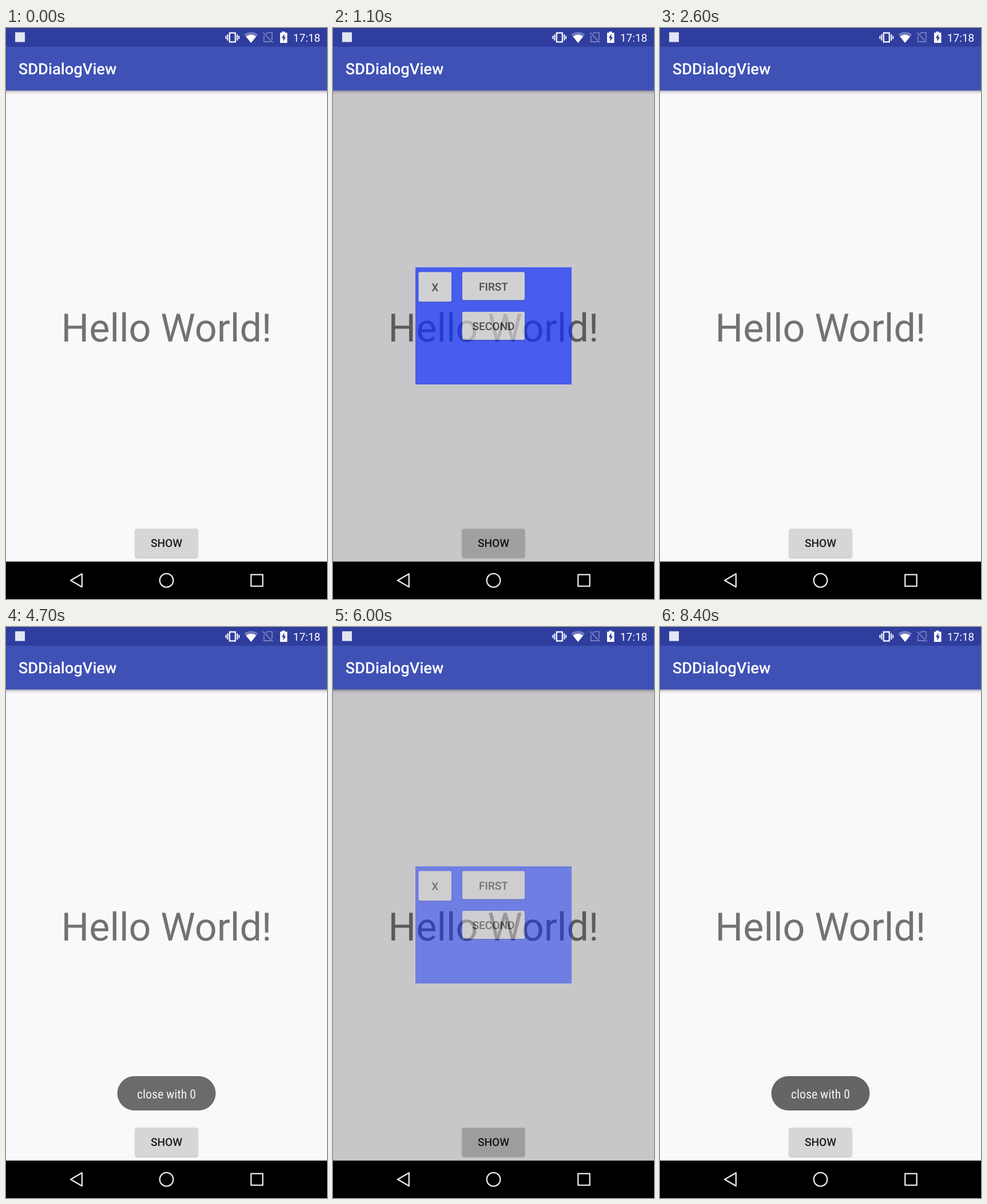
An HTML page for the animation above (8500 ms loop, 561 by 998 pixels).

```html
<!DOCTYPE html>
<html lang="en">
<head>
<meta charset="utf-8">
<title>SDDialogView</title>
<style>
  html, body { margin: 0; width: 100%; height: 100%; overflow: hidden; background: #000; }
  svg { display: block; width: 100vw; height: 100vh; }
  text { font-family: Roboto, sans-serif; text-rendering: geometricPrecision; }
  .mid { text-anchor: middle; }
  .label { font-size: 19.1px; font-weight: 500; fill: #000; fill-opacity: .87; }
  .face { fill: #d6d5d8; }
  .raised { filter: drop-shadow(0 1.6px 1.4px rgba(0, 0, 0, .34)); }
  .toast { font-family: "Roboto Condensed", Roboto, sans-serif; font-stretch: 75%; font-size: 21.8px; fill: #f4f4f4; }
  .nav { fill: none; stroke: #ececec; stroke-width: 2.3; stroke-linejoin: round; }
</style>
</head>
<body>
<svg viewBox="0 0 561 998" preserveAspectRatio="none">
  <defs>
    <linearGradient id="shade" x2="0" y2="1">
      <stop stop-color="#000" stop-opacity=".34"/>
      <stop offset=".4" stop-color="#000" stop-opacity=".12"/>
      <stop offset="1" stop-color="#000" stop-opacity="0"/>
    </linearGradient>
  </defs>

  <!-- page -->
  <rect width="561" height="998" fill="#f9f8fb"/>
  <text class="mid" x="280.5" y="547.5" font-size="68.2" fill-opacity=".54">Hello World!</text>
  <g class="raised"><rect class="face" x="226" y="875.5" width="109" height="49.5" rx="2.7"/></g>
  <rect id="ripple" x="226" y="875.5" width="109" height="49.5" rx="2.7" opacity="0"/>
  <text class="label mid" x="280.5" y="907.3">SHOW</text>
  <rect id="scrim" y="109" width="561" height="824" opacity="0"/>

  <!-- dialog -->
  <g id="dialog" opacity="0">
    <rect x="144" y="418.3" width="273" height="204.7" fill="#1030ff"/>
    <g class="raised">
      <rect class="face" x="149.5" y="426.5" width="57.5" height="51.8" rx="2.7"/>
      <rect class="face" x="226" y="426.5" width="109" height="49" rx="2.7"/>
      <rect class="face" x="226" y="496" width="109" height="49" rx="2.7"/>
    </g>
    <g class="label mid">
      <text x="178.2" y="459.8">X</text>
      <text x="280.5" y="458.5">FIRST</text>
      <text x="280.5" y="528">SECOND</text>
    </g>
  </g>

  <!-- toast -->
  <g id="toast" opacity="0">
    <rect x="194.5" y="785" width="172" height="60" rx="30" fill="#616062"/>
    <text class="toast mid" x="280.5" y="823.8">close with 0</text>
  </g>

  <!-- app bar -->
  <rect y="109" width="561" height="7" fill="url(#shade)"/>
  <rect width="561" height="109.2" fill="#3f51b5"/>
  <rect width="561" height="32.7" fill="#2f3e9e"/>
  <text x="21.8" y="81.4" font-size="27.3" font-weight="500" fill="#fff">SDDialogView</text>

  <!-- status icons -->
  <rect x="16" y="7.5" width="17" height="17" fill="#e2e5f2"/>
  <g fill="#fff">
    <path d="M390.8 8.6h10v15.8h-10z" fill="none" stroke="#fff" stroke-width="2.2"/>
    <path d="M386.4 11h2v11h-2zM383.4 13.7h2v5.6h-2zM403.2 11h2v11h-2zM406.2 13.7h2v5.6h-2z"/>
    <path d="M416.4 11.2Q428.3 2.8 440.2 11.2L428.3 26z" opacity=".32"/>
    <path d="M419.4 14.9Q428.3 8.6 437.2 14.9L428.3 26z"/>
    <path d="M479 8.2h3.4V6.2h5v2h4.1V26H479z"/>
    <text x="501.8" y="23.8" font-size="19.1">17:18</text>
  </g>
  <path d="M486.6 10.2L481.7 17.6H484.5V23.6L489.1 16.1H486.4z" fill="#2f3e9e"/>
  <g stroke="#7680bd" fill="none" stroke-width="1.8">
    <path d="M454 10.6L457 8.2H465V20.5M450.8 13.5V24H463"/>
    <path d="M449.2 8L466.4 25.4"/>
  </g>

  <!-- navigation bar -->
  <rect y="932.6" width="561" height="65.4"/>
  <g class="nav">
    <path d="M113 965.5L132.8 954V977z"/>
    <circle cx="280.5" cy="965.5" r="11.8"/>
    <rect x="428.3" y="955.3" width="20.4" height="20.4"/>
  </g>
</svg>
<script>
  const LOOP = 8500, STEP = 100;
  const rounds = [
    { open: 785, close: 2600, fade: 4600 },
    { open: 5757, close: 7900, fade: 9900 }
  ];
  const parts = ['ripple', 'scrim', 'dialog', 'toast'].map(id => document.getElementById(id));
  const ramp = (t, from, ms) => Math.min(1, Math.max(0, (t - from) / ms));
  const easeInOut = p => (1 - Math.cos(Math.PI * p)) / 2;
  const easeOut = p => 1 - (1 - p) ** 2;

  function pose(t) {
    const { open, close, fade } = t < 5000 + 300 ? rounds[0] : rounds[1];
    const shown = t < close ? 1 : 0;
    return [
      t < open ? 0 : 0.134 * (1 - ramp(t, open, 615)),
      shown * 0.2 * ramp(t, open, 150),
      shown * easeInOut(ramp(t, open, 500)),
      easeOut(ramp(t, close + 80, 500)) * (1 - ramp(t, fade, 550) ** 1.6)
    ];
  }

  const start = performance.now();
  function draw() {
    const t = Math.max(0, performance.now() - start) % LOOP;
    const values = pose(Math.floor(t / STEP) * STEP);
    parts.forEach((el, i) => el.setAttribute('opacity', values[i].toFixed(4)));
    requestAnimationFrame(draw);
  }
  draw();
</script>
</body>
</html>
```
